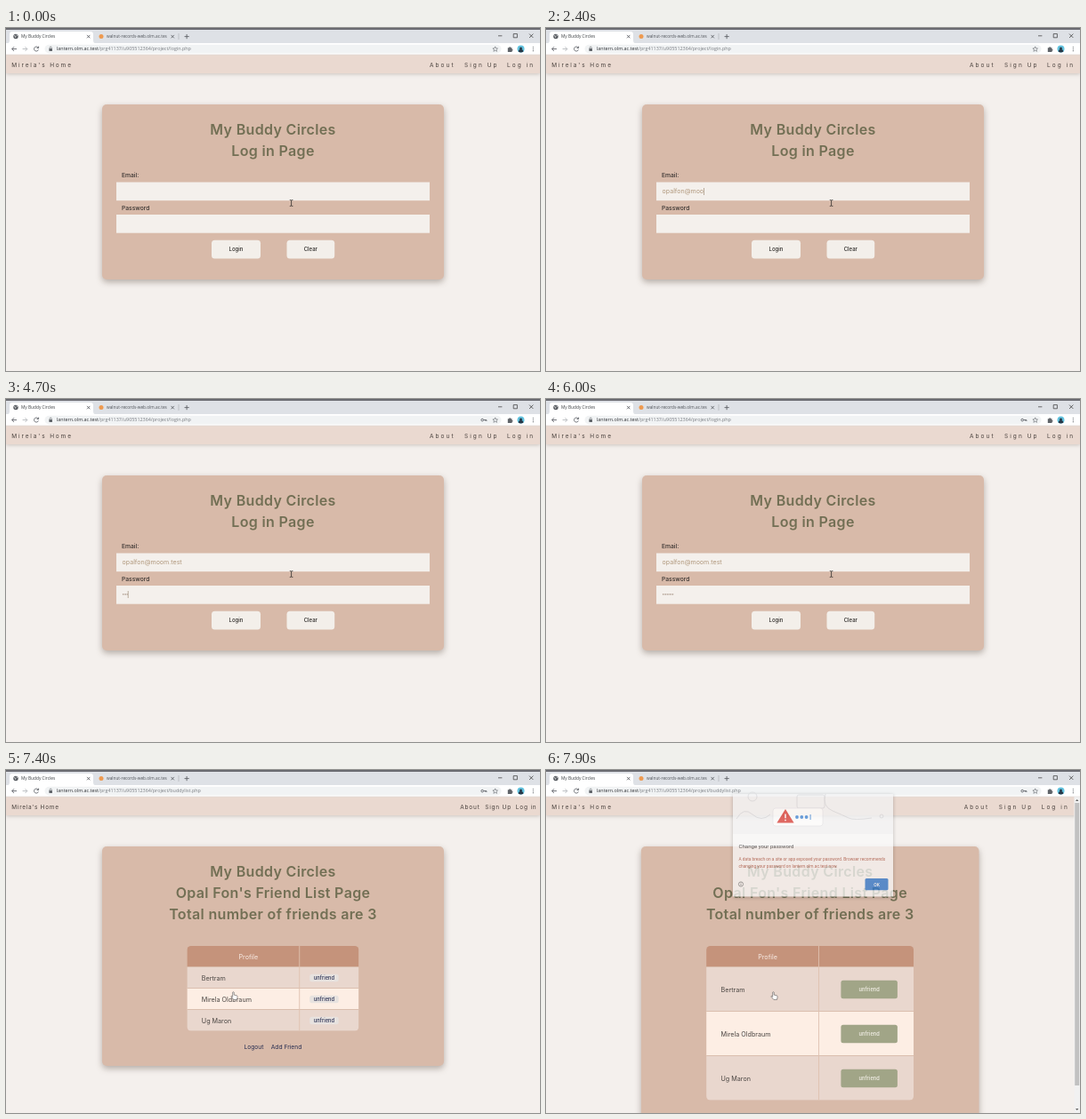
An HTML page that plays this animation: 600x386 px, repeating every 8000 ms.

```html
<!DOCTYPE html>
<html lang="en">
<head>
<meta charset="utf-8">
<title>My Buddy Circles</title>
<style>
  html, body { margin: 0; width: 100%; height: 100%; overflow: hidden; background: #f4f0ed; }
  svg { display: block; width: 100vw; height: 100vh; }
  text { font-family: Inter, "Open Sans", sans-serif; white-space: pre; }
  .ui { font-family: "Open Sans", "Noto Sans", sans-serif; }
  .dlg { font-family: Roboto, sans-serif; }
  .title { font-size: 16px; font-weight: 600; letter-spacing: .34px; fill: #726f54; text-anchor: middle; }
  .nav { font-size: 6.5px; fill: #4a423e; }
  .label { font-size: 6.7px; font-weight: 500; fill: #35302e; }
  .typed { font-size: 7.05px; fill: #b1987d; }
  .btn { font-weight: 500; font-size: 6px; text-anchor: middle; }
  .cell { font-size: 7.2px; fill: #4b4643; }
  .small { font-size: 5.7px; font-weight: 500; letter-spacing: .05px; text-anchor: middle; }
  .link { font-size: 6.7px; text-anchor: middle; }
  .card { fill: #d8baa9; filter: drop-shadow(0 3px 3.5px rgba(60, 40, 30, .34)); }
  .line { fill: none; stroke: #5f6368; stroke-width: .9; }
</style>
</head>
<body>
<svg viewBox="0 0 600 386" preserveAspectRatio="none">
  <defs><clipPath id="round"><rect id="roundBox" y="198" rx="4.5"/></clipPath></defs>
  <rect width="600" height="386" fill="#f4f0ed"/>

  <g id="login">
    <rect class="card" x="108" y="86" width="384" height="197" rx="5"/>
    <text class="title" x="300" y="119.7">My Buddy Circles</text>
    <text class="title" x="300" y="143.7">Log in Page</text>
    <text class="label" x="130" y="168">Email:</text>
    <rect x="124" y="173.5" width="352" height="20.7" fill="#f4f0ec"/>
    <text class="label" x="130" y="204.6">Password</text>
    <rect x="124" y="210" width="352" height="20.7" fill="#f4f0ec"/>
    <text class="typed" id="email" x="130.6" y="186.3"></text>
    <g id="dots" fill="#927b68"></g>
    <rect id="caret" width=".7" height="8" fill="#a08c78"/>
    <rect id="loginBtn" x="231" y="238.8" width="55" height="20.6" rx="3.5"/>
    <text class="btn" x="258.5" y="251.2" fill="#2b2927">Login</text>
    <rect x="315.5" y="238.8" width="53.7" height="20.6" rx="3.5" fill="#f3efea"/>
    <text class="btn" x="342.3" y="251.2" fill="#2b2927">Clear</text>
  </g>

  <g id="friends">
    <rect id="card2" class="card" y="86" rx="5"/>
    <g id="titles">
      <text class="title" y="119.7">My Buddy Circles</text>
      <text class="title" y="143.7">Opal Fon's Friend List Page</text>
      <text class="title" y="167.7">Total number of friends are 3</text>
    </g>
    <g id="table" clip-path="url(#round)"></g>
    <g id="links"></g>
  </g>

  <g id="header">
    <rect y="29" width="600" height="22" fill="#ead9d0" style="filter:drop-shadow(0 1px 2px rgba(80,60,50,.25))"/>
  </g>
  <g id="scroll">
    <rect x="593.4" y="30" width="6.6" height="356" fill="#f1f1f1"/>
    <rect x="594.2" y="37" width="5" height="318" fill="#c1c1c1"/>
    <path d="M595 35l1.7-2 1.7 2zM595 381l1.7 2 1.7-2z" fill="#606060"/>
  </g>

  <g id="browser">
    <rect width="600" height="18" fill="#dee1e6"/>
    <rect width="600" height="2" fill="#6a6b71"/>
    <path d="M1 17.5Q4 17 4 14V7Q4 4 7 4H95Q98 4 98 7V14Q98 17 101 17.5Z" fill="#fff"/>
    <rect y="17" width="600" height="12.9" fill="#fff"/>
    <path d="M0 30H600" stroke="#d9d6d5" stroke-width=".5"/>
    <g id="globe"><circle cx="11" cy="9.5" r="2.7" fill="#55595e"/><path d="M9 8.6l2 .7-.4 1.6M12 7.4l.6 1.5" stroke="#fff" stroke-width=".7" fill="none"/></g>
    <path id="spin" d="M11 6.9a2.6 2.6 0 1 1-2.6 2.6" fill="none" stroke="#7d8793" stroke-width=".9"/>
    <text class="ui" x="17" y="11.3" font-size="4.8" fill="#3c4043">My Buddy Circles</text>
    <circle cx="107" cy="9.6" r="2.5" fill="#ee9a50"/>
    <text class="ui" x="113" y="11.3" font-size="4.75" fill="#50545a">walnut-records-web.olm.ac.tes</text>
    <path class="line" d="M91 7.9l3.4 3.4m0-3.4l-3.4 3.4M185.5 7.9l3.4 3.4m0-3.4l-3.4 3.4M200.5 9.6h5.2m-2.6-2.6v5.2"/>
    <path d="M194 6v7" stroke="#a9adb3" stroke-width=".6"/>
    <path class="line" d="M553 8.8h4.4M570.2 6.6h4.2v4.2h-4.2zM588 6.6l4.4 4.4m0-4.4l-4.4 4.4" style="stroke:#333;stroke-width:.7"/>
    <path class="line" d="M12 23.6H6.8m2.3-2.4L6.7 23.6l2.4 2.4"/>
    <path class="line" d="M18.6 23.6h5.2m-2.3-2.4l2.4 2.4-2.4 2.4" style="stroke:#b5b8bb"/>
    <path class="line" d="M36.2 22.2a2.5 2.5 0 1 0 .2 2.3M36.6 20.6v2h-2"/>
    <rect x="43.5" y="18.7" width="513" height="9.8" rx="4.9" fill="#f1f3f4"/>
    <rect x="48.4" y="23" width="3.6" height="2.9" rx=".4" fill="#5f6368"/>
    <path class="line" d="M49.1 23v-.8a1.1 1.1 0 0 1 2.2 0v.8" style="stroke-width:.6"/>
    <text class="ui" x="57" y="25.4" font-size="5.4" fill="#777b80"><tspan fill="#2c2f33">lantern.olm.ac.test</tspan><tspan id="path"></tspan></text>
    <g id="key" class="line"><circle cx="535.2" cy="23.6" r="1.3"/><path d="M536.5 23.6h3.4v1.4m-1.2-1.4v1"/></g>
    <path d="M549.7 20.9l.8 1.9 2 .2-1.5 1.3.5 2-1.8-1.1-1.8 1.1.5-2-1.5-1.3 2-.2z" class="line" style="stroke-width:.6"/>
    <path d="M563.8 22.2h1.4a1 1 0 0 1 2 0h1.3v1.5a1 1 0 0 1 0 2v1.2h-4.7z" fill="#5f6368"/>
    <circle cx="578.5" cy="23.6" r="4" fill="#63c3df"/>
    <path d="M575.6 26.4q.4-2.1 1.9-2.3a1.5 1.5 0 1 1 2 0q1.5.2 1.9 2.3-2.9 2-5.8 0z" fill="#273746"/>
    <g fill="#5f6368"><circle cx="592.3" cy="21.5" r=".6"/><circle cx="592.3" cy="23.6" r=".6"/><circle cx="592.3" cy="25.7" r=".6"/></g>
  </g>

  <g id="dialog">
    <rect x="210" y="27" width="180" height="115.5" fill="#fafafa" style="filter:drop-shadow(0 1px 2px rgba(0,0,0,.3))"/>
    <rect x="210" y="27" width="180" height="45" fill="#f3f3f4"/>
    <g fill="none" stroke="#d8d9dc" stroke-width="1">
      <path d="M214 55q8-14 18-5t20 0M314 27q-4 14 8 19t18 8 26 0"/>
      <rect x="282" y="28" width="31" height="15" rx="2"/>
      <circle cx="232" cy="30" r="5"/><circle cx="377" cy="52" r="2"/>
    </g>
    <rect x="255" y="43" width="56" height="20" rx="3" fill="#fff" stroke="#dddee1" stroke-width=".6"/>
    <path d="M269 44l9.6 15.6h-19.2z" fill="#d93a32"/>
    <path d="M269 49.5v4.8m0 1.4v1.5" stroke="#fff" stroke-width="1.5"/>
    <g fill="#3e86d8"><circle cx="282" cy="53" r="1.9"/><circle cx="287.3" cy="53" r="1.9"/><circle cx="292.6" cy="53" r="1.9"/><rect x="296.6" y="50" width="1" height="6"/></g>
    <text class="dlg" x="216.5" y="87.6" font-size="6.1" fill="#2a2b2e">Change your password</text>
    <g font-size="4.8" fill="#a8503f">
      <text class="dlg" x="216.5" y="101.6">A data breach on a site or app exposed your password. Browser recommends</text>
      <text class="dlg" x="216.5" y="109.6">changing your password on lantern.olm.ac.test now.</text>
    </g>
    <circle class="line" cx="219" cy="128.5" r="2.6" style="stroke-width:.7"/>
    <path class="line" d="M219 128v1.9m0-3.2v.7" style="stroke-width:.7"/>
    <rect x="358.5" y="122" width="26" height="13.3" rx="1.5" fill="#2f7ad2"/>
    <text class="dlg" x="371.5" y="130.6" font-size="5" font-weight="500" fill="#fff" text-anchor="middle">OK</text>
  </g>

  <g id="beam" fill="none" stroke="#302c2a" stroke-width=".8"><path d="M-1.8-3.4H-.5L0-3 .5-3.4H1.8M0-3V3M-1.8 3.4H-.5L0 3 .5 3.4H1.8"/></g>
  <path id="hand" d="M-1.7-4.2q.9-.8 1.5 0v3l3 .7q1 .3.9 1.4l-.5 3.2H-.6L-3.4.9q-.3-1 .7-.8l1 .8z" fill="#fff" stroke="#55504e" stroke-width=".6"/>
</svg>

<script>
const LOOP = 8000, STEP = 100, NAV = 7200, GROW = 7400;
const EMAIL = 'opalfon@moom.test';
const KEYS = [200, 300, 400, 600, 800, 1000, 1100, 1800, 2100, 2300, 2400, 2500, 2600, 2900, 3000, 3100, 3400];
const SECRET = [4300, 4400, 4600, 4700, 4900, 5100, 5200, 5500];
const CARET_OFF = [[0, 100], [1700, 1800], [4100, 4300], [6000, 6500], [7000, 7200]];
const $ = id => document.getElementById(id);

function set(node, attrs) {
  for (const k in attrs) node.setAttribute(k, attrs[k]);
  return node;
}
function add(parent, tag, attrs, text) {
  const node = set(document.createElementNS('http://www.w3.org/2000/svg', tag), attrs);
  if (text) node.textContent = text;
  return parent.appendChild(node);
}
const show = (id, on) => { $(id).style.display = on ? '' : 'none'; };
const clamp = x => Math.max(0, Math.min(1, x));
const lerp = (a, b, p) => a + (b - a) * p;
const mix = (a, b, p) => `rgb(${a.map((v, i) => Math.round(lerp(v, b[i], p)))})`;
const typedBy = (times, t) => times.filter(k => k <= t).length;

// cubic-bezier(.25, .1, .25, 1)
const bez = (u, a, b) => 3 * u * (1 - u) ** 2 * a + 3 * u * u * (1 - u) * b + u ** 3;
function ease(x) {
  if (x <= 0 || x >= 1) return clamp(x);
  let lo = 0, hi = 1, u;
  for (let i = 0; i < 20; i++) {
    u = (lo + hi) / 2;
    if (bez(u, .25, .25) < x) lo = u; else hi = u;
  }
  return bez(u, .1, 1);
}

const CREAM = [243, 239, 234], GREEN = [161, 165, 135], GREY = [231, 226, 223];
const NAVY = [38, 44, 80], INK = [52, 50, 50], PALE = [247, 243, 236];

const brand = add($('header'), 'text', { class: 'nav', x: 6.3, y: 43.6 }, "Mirela's Home");
const menu = [['About', 476, 510.3], ['Sign Up', 515, 538.2], ['Log in', 563, 572.8]]
  .map(([name, wide, tight]) => ({ wide, tight, node: add($('header'), 'text', { class: 'nav', y: 43.6 }, name) }));
const dots = SECRET.map((_, i) => add($('dots'), 'circle', { cx: 131.5 + i * 1.6, cy: 219.8, r: .6 }));

const table = $('table');
const head = add(table, 'rect', { y: 198, height: 23.5, fill: '#c5937b' });
const profile = add(table, 'text', { class: 'cell', y: 212.8, style: 'fill:#f8ece5;text-anchor:middle' }, 'Profile');
const rows = ['Bertram', 'Mirela Oldbraum', 'Ug Maron'].map((name, i) => ({
  back: add(table, 'rect', { fill: i === 1 ? '#fdeee4' : '#e9d7ce' }),
  rule: add(table, 'rect', { height: .8, fill: '#d6b8a6' }),
  name: add(table, 'text', { class: 'cell' }, name),
  btn: add(table, 'rect', { rx: 2.5 }),
  label: add(table, 'text', { class: 'small' }, 'unfriend')
}));
const divider = add(table, 'rect', { y: 198, width: .9, fill: '#dfc1b0' });
const links = [['Logout', -21.5, -50, 23], ['Add Friend', 15, 43, 36]].map(([name, from, to, w]) => ({
  from, to, w,
  btn: add($('links'), 'rect', { rx: 2.5, fill: '#a1a587' }),
  label: add($('links'), 'text', { class: 'link' }, name)
}));

function drawLogin(t) {
  const n = typedBy(KEYS, t), d = typedBy(SECRET, t), inPass = t >= 3600;
  $('email').textContent = EMAIL.slice(0, n);
  dots.forEach((dot, i) => { dot.style.display = i < d ? '' : 'none'; });
  const x = inPass ? 130.4 + d * 1.6 : 130.8 + (n ? $('email').getComputedTextLength() : 0);
  set($('caret'), { x, y: inPass ? 216 : 180 });
  show('caret', !CARET_OFF.some(([a, b]) => t >= a && t < b));
  set($('loginBtn'), { fill: mix(CREAM, GREEN, ease((t - 6700) / 500)) });
}

function drawFriends(p) {
  const bar = p > .4, mid = bar ? 296.7 : 300, cardW = bar ? 379.6 : 384;
  const q = p ** 1.6;
  const rowH = lerp(24, 50, p), bottom = 221.5 + rowH * 3;
  const w = lerp(193, 233, q), left = mid - w / 2 - .1, col = left + 126.3;

  set($('card2'), { x: mid - cardW / 2, width: cardW, height: bottom + lerp(39.5, 60, p) - 86 });
  for (const line of $('titles').children) set(line, { x: mid });
  set($('roundBox'), { x: left, width: w, height: bottom - 198 });
  set(head, { x: left, width: w });
  set(profile, { x: left + 69 });
  set(divider, { x: col - .4, height: bottom - 198 });

  const bw = lerp(32.5, 63.5, p), bh = lerp(8.5, 20.5, p), bx = col + lerp(11.5, 25, p);
  rows.forEach((r, i) => {
    const y = 221.5 + rowH * i, cy = y + rowH / 2 + .6;
    set(r.back, { x: left, y, width: w, height: rowH + .2 });
    set(r.rule, { x: left, y: y - .4, width: w });
    set(r.name, { x: left + 16.4, y: cy + 2.7 });
    set(r.btn, { x: bx, y: cy - bh / 2, width: bw, height: bh, fill: mix(GREY, GREEN, p) });
    set(r.label, { x: bx + bw / 2, y: cy + 2.1, fill: mix(NAVY, PALE, p) });
  });

  const ly = bottom + lerp(17.5, 32, p), lh = lerp(9, 22, p);
  for (const l of links) {
    const x = mid + lerp(l.from, l.to, p), lw = l.w + 43 * p;
    set(l.btn, { x: x - lw / 2, y: ly - lh / 2, width: lw, height: lh, opacity: p });
    set(l.label, { x, y: ly + 2.7, fill: mix(NAVY, INK, p), 'font-weight': bar ? 500 : 400 });
  }
  return bar;
}

function drawMouse(t) {
  const u = clamp((t - 6200) / 600), p = u * u * (3 - 2 * u);
  const x = lerp(320.6, 256.4, p), y = lerp(197, 254.3, p), pointing = y > 231;
  show('beam', !pointing);
  show('hand', pointing);
  set($(pointing ? 'hand' : 'beam'), { transform: `translate(${x} ${y})` });
}

function render(t) {
  const inside = t >= NAV;
  show('login', !inside);
  show('friends', inside);
  let bar = false;
  if (inside) bar = drawFriends(ease((t - GROW) / 450)); else drawLogin(t);
  show('scroll', bar);

  const wide = inside ? ease((t - GROW) / 200) : 1;
  set(brand, { 'letter-spacing': lerp(.7, 1.87, wide) });
  for (const m of menu)
    set(m.node, { x: lerp(m.tight, m.wide, wide) - (bar ? 6.3 : 0), 'letter-spacing': lerp(.8, 2.05, wide) });

  $('path').textContent = '/prg41137/u905512364/project/' + (inside ? 'buddylist.php' : 'login.php');
  show('key', t >= 4300);
  const busy = t >= 6900 && t < 7400;
  show('globe', !busy);
  show('spin', busy);
  set($('spin'), { transform: `rotate(${t * .45 % 360} 11 9.5)` });

  const fade = clamp((t - 7800) / 135);
  show('dialog', fade > 0);
  set($('dialog'), { opacity: fade });
  drawMouse(t);
}

const start = performance.now();
let last = -1;
function tick() {
  const t = Math.floor(((performance.now() - start + 5) % LOOP) / STEP) * STEP;
  if (t !== last) render(last = t);
  requestAnimationFrame(tick);
}
tick();
</script>
</body>
</html>
```
